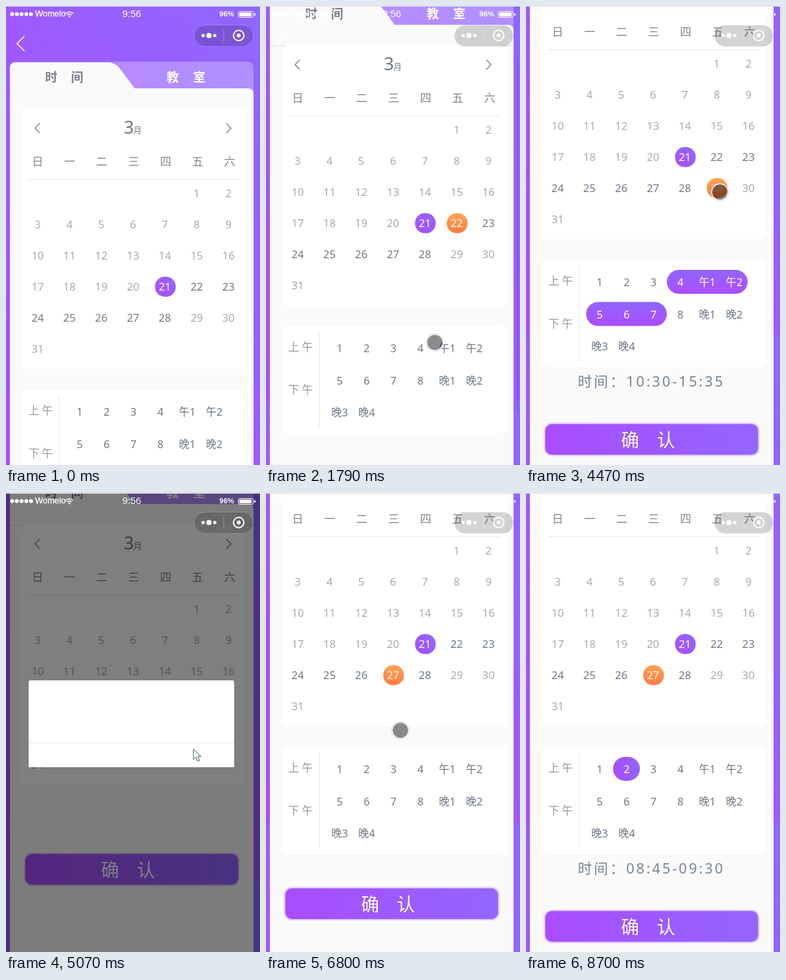
Write an HTML page that moves like this. It is 393 by 708 pixels and loops after 9650 ms.

```html
<!DOCTYPE html>
<html lang="zh-CN">
<head>
<meta charset="utf-8">
<title>选择时间</title>
<style>
  html, body { margin: 0; width: 100%; height: 100%; overflow: hidden; background: #a052ff; }
  #stage { position: absolute; left: 0; top: 0; width: 393px; height: 708px; overflow: hidden; }
  svg { position: absolute; left: 0; top: 0; overflow: hidden; }
  text { font-family: "Noto Sans", "Noto Sans CJK SC", "Noto Sans CJK", sans-serif; white-space: pre; }
  .bar text { font-family: "Liberation Sans", Arial, sans-serif; }
  #modal { position: absolute; left: 35px; top: 288.5px; width: 318px; height: 134px; border-radius: 3px;
    background: #fff; box-shadow: 0 0 0 900px rgba(0,0,0,.5); }
  #key { position: absolute; left: 0; bottom: 0; width: 100%; height: 38px; border-top: 1px solid #e5e5e5;
    box-sizing: border-box; }
</style>
</head>
<body>
<div id="stage">
  <svg width="393" height="708">
    <defs>
      <linearGradient id="bg" x1="0" y1="1" x2="1" y2="0"><stop stop-color="#ad4cff"/><stop offset="1" stop-color="#8f68ff"/></linearGradient>
      <linearGradient id="flat"><stop stop-color="#a94cff"/><stop offset="1" stop-color="#9366ff"/></linearGradient>
      <linearGradient id="tall" x1="0" y1="0" x2="0" y2="1"><stop stop-color="#9166ff"/><stop offset="1" stop-color="#ad4cff"/></linearGradient>
      <linearGradient id="warm" x1="0" y1="0" x2="0" y2="1"><stop stop-color="#ffa552"/><stop offset="1" stop-color="#ff7a42"/></linearGradient>
      <filter id="glow" x="-5%" y="-20%" width="110%" height="140%"><feGaussianBlur stdDeviation="1.8"/></filter>
    </defs>
    <g id="page">
      <rect width="393" height="708" fill="url(#bg)"/>
      <rect y="708" width="393" height="708" fill="url(#bg)"/>
      <path d="M6 140V96Q6 86 16 86H373Q383 86 383 96V140Z" fill="#fff" fill-opacity=".28"/>
      <path d="M6 1416V96Q6 87 15 87H157Q168 87 175 95L199 127H374Q383 127 383 136V1416Z" fill="#fafafa"/>
      <path id="seam" d="M6 159.5H383" stroke="#dcdcdc"/>
      <rect x="24" y="159" width="348" height="401" rx="9" fill="#fff"/>
      <path d="M52 181L45 188.5L52 196M341 181L348 188.5L341 196" fill="none" stroke="#8e9097" stroke-width="1.8"/>
      <path d="M33 267.5H362" stroke="#e6e6e6"/>
      <g id="days"></g>
      <g id="card">
        <rect x="24" y="592" width="348" height="165" rx="9" fill="#fff"/>
        <path d="M82.5 600V748" stroke="#e8e8e8"/>
      </g>
      <text id="span" x="80" y="787" font-size="22" letter-spacing="3" fill="#7a8394"></text>
      <g id="ok">
        <rect x="29" y="-1" width="331" height="49" rx="11" fill="#a050ff" fill-opacity=".65" filter="url(#glow)"/>
        <rect x="30" width="329" height="47" rx="10" fill="url(#flat)"/>
      </g>
    </g>
    <path d="M28.5 46.5L17 58L28.5 69.5" fill="none" stroke="#fff" stroke-width="1.5"/>
    <rect id="thumb" x="388" width="3" height="545" rx="1.5" fill-opacity=".08"/>
  </svg>
  <div id="modal"><div id="key"></div></div>
  <svg class="bar" width="393" height="708" fill="#fff">
    <rect width="393" height="1" fill="#e2dfe8"/>
    <g id="dots"></g>
    <text x="45" y="16" font-size="13" stroke="#fff" stroke-width=".3">Womelo</text>
    <path d="M92 11.5Q98 6.5 104 11.5M94.3 14Q98 10.8 101.7 14" fill="none" stroke="#fff" stroke-width="1.5"/>
    <circle cx="98" cy="16" r="1.5"/>
    <text x="194.5" y="17" font-size="15" text-anchor="middle">9:56</text>
    <text x="330" y="16" font-size="11.5" font-weight="bold">96%</text>
    <rect x="359.5" y="8.5" width="23" height="9" rx="2" fill="none" stroke="#fff"/>
    <rect x="361" y="10" width="19" height="6" rx="1"/>
    <rect x="384" y="11" width="2" height="4" rx="1"/>
    <rect x="291.5" y="29.5" width="91" height="33" rx="16.5" fill="#000" fill-opacity=".17" stroke="#fff" stroke-opacity=".2"/>
    <path d="M337 37V55" stroke="#fff" stroke-opacity=".35"/>
    <circle cx="305" cy="45.5" r="2.6"/><circle cx="314" cy="45.5" r="4"/><circle cx="323" cy="45.5" r="2.6"/>
    <circle cx="360" cy="45.5" r="8" fill="none" stroke="#fff" stroke-width="2"/><circle cx="360" cy="45.5" r="3"/>
    <g id="touch">
      <circle id="pad" r="12" fill="#000"/>
      <circle r="12.8" fill="none" stroke="#fff" stroke-width="1.5"/>
      <circle r="13.8" fill="none" stroke="#bbb" stroke-width=".6"/>
    </g>
    <path id="arrow" d="M0 0V16L4 12.5L6.8 18.8L9.5 17.6L6.7 11.5H11.5Z" stroke="#2f5a45"/>
  </svg>
</div>
<script>
const LOOP = 9650;
const SCROLL = 200, DRAG = 1582, DRAG_END = 2310;
const REFUSE = 4540, REOPEN = 6800;
const DARK = "#6f7787", PALE = "#aaa";

// pointer moves: start, end, and where it comes to rest
const moves = [
  [230, 870, 302, 436], [1400, DRAG, 277, 605], [DRAG, DRAG_END, 245, 430],
  [2700, 2860, 203, 481], [3090, 3230, 250, 625], [3460, 3620, 230, 182], [3770, 4160, 300, 287],
  [4600, 5070, 290, 395], [5500, 5640, 284, 421], [5700, 6490, 208, 366],
  [6880, 7410, 170, 440], [8360, 8700, 246, 740]
];

const $ = id => document.getElementById(id);
const page = $("page"), days = $("days"), card = $("card"), ok = $("ok");

function set(el, attrs) {
  for (const k in attrs) el.setAttribute(k, attrs[k]);
  return el;
}
function add(parent, tag, attrs) {
  return parent.appendChild(set(document.createElementNS("http://www.w3.org/2000/svg", tag), attrs));
}
function word(parent, str, x, y, size, fill, weight = 400) {
  const el = add(parent, "text", { x, y: y + size * .36, "font-size": size, fill, "font-weight": weight, "text-anchor": "middle" });
  el.textContent = str;
  return el;
}
const show = (el, on) => set(el, { visibility: on ? "visible" : "hidden" });
const part = (t, a, b) => Math.min(1, Math.max(0, (t - a) / (b - a)));
const ease = p => p * (2 - p);

// calendar
[..."时间"].forEach((c, i) => word(page, c, 70 + i * 40, 110, 19, "#7b808d", 700));
[..."教室"].forEach((c, i) => word(page, c, 258 + i * 41, 110, 19, "#fff", 700));
word(days, "3", 190, 187, 27.5, DARK);
word(days, "月", 203.5, 191, 13, DARK);
[..."日一二三四五六"].forEach((c, i) => word(days, c, 49 + i * 49.5, 240, 17.5, "#82868f"));

const cell = d => ({ x: 49 + (d + 4) % 7 * 49.2, y: 289 + Math.floor((d + 4) / 7) * 48 });
const disc = fill => add(days, "rect", { width: 32, height: 31, rx: 15, fill });
const place = (el, d) => set(el, { x: cell(d).x - 15.2, y: cell(d).y - 15.5 });
const today = disc("url(#bg)"), mark = disc("url(#warm)");
place(today, 21);
const isOpen = d => d > 20 && d < 29;
const dates = Array.from({ length: 31 }, (_, i) => {
  const { x, y } = cell(i + 1);
  return word(days, i + 1, x, y, 16.8, PALE, isOpen(i + 1) ? 500 : 400);
});

// lesson slots
["上午", "下午"].forEach((s, r) => [...s].forEach((c, i) => word(card, c, 43 + i * 21, 624 + r * 66, 17, "#999")));
const COL = 41.65, ROW = 49.6;
const pills = [0, 1].map(r => add(card, "rect", { y: 607 + r * ROW, height: 37, rx: 18.5 }));
const slots = "1 2 3 4 午1 午2 5 6 7 8 晚1 晚2 晚3 晚4".split(" ").map((s, i) =>
  word(card, s, 114 + i % 6 * COL, 626 + Math.floor(i / 6) * ROW, 16.5, DARK));
[..."确认"].forEach((c, i) => word(ok, c, 161 + i * 55.5, 25, 28, "#fff", 500));
for (let i = 0; i < 5; i++) add($("dots"), "circle", { cx: 9.5 + i * 7.3, cy: 12.5, r: 3 });

function pointer(t) {
  let x = 270, y = 735;
  for (const [a, b, tx, ty] of moves) {
    const p = ease(part(t, a, b));
    x += (tx - x) * p;
    y += (ty - y) * p;
  }
  return `translate(${x} ${y})`;
}
function pickedDay(t) {
  if (t >= REOPEN) return 27;
  if (t < 1400 || t >= REFUSE) return 0;
  return t < 4470 ? 22 : 29;
}
function pickedSlots(t) {
  if (t >= 7640) return { from: 1, to: 1, span: "08:45-09:30" };
  if (t < 2700 || t >= REFUSE) return null;
  return t < 3090 ? { from: 3, to: 3, span: "10:30-11:15" } : { from: 3, to: 8, span: "10:30-15:35" };
}

function drawPage(t, closed) {
  const scroll = closed ? 110 : Math.round(SCROLL * ease(part(t, DRAG, DRAG_END)));
  set(page, { transform: `translate(0 ${-scroll})` });
  show($("seam"), scroll > 0);
  show($("thumb"), t > DRAG && t < 2390);
  set($("thumb"), { y: 5 + scroll * .76, fill: "#000" });

  const day = pickedDay(t);
  show(mark, day > 0);
  if (day) place(mark, day);
  dates.forEach((el, i) => {
    const d = i + 1, lit = d === 21 || d === day;
    set(el, { fill: lit ? (isOpen(d) ? "#fff" : "#d0c0b8") : isOpen(d) ? DARK : PALE });
  });
}

function drawSlots(t, closed) {
  const pick = pickedSlots(t);
  set(card, { display: closed ? "none" : "inline" });
  pills.forEach((el, r) => {
    const from = pick ? Math.max(pick.from - r * 6, 0) : 0;
    const count = pick ? Math.min(pick.to - r * 6, 5) - from + 1 : 0;
    show(el, count > 0);
    if (count > 0) set(el, { x: 93 + from * COL, width: count * COL, fill: count > 1 ? "url(#tall)" : "url(#flat)" });
  });
  slots.forEach((el, i) => set(el, { fill: pick && i >= pick.from && i <= pick.to ? "#fff" : DARK }));
  $("span").textContent = pick ? "时间：" + pick.span : "";
  set(ok, { transform: `translate(0 ${closed ? 667 : pick ? 845 : 810})` });
}

function drawTop(t) {
  const p = part(t, 4480, 4700) * (1 - part(t, 5524, 5756));
  $("modal").style.opacity = p;
  $("modal").style.transform = `scaleY(${p})`;
  $("key").style.background = t >= 5240 && t < 5380 ? "#ececec" : "#fff";
  $("key").style.visibility = t < 5550 ? "visible" : "hidden";

  const native = t >= REFUSE && t < 5780;
  show(set($("touch"), { transform: pointer(t) }), !native);
  show(set($("arrow"), { transform: pointer(t) }), native);
  set($("pad"), { "fill-opacity": t >= 4330 && t < 4470 ? .6 : .45 });
}

const begin = performance.now();
function tick() {
  const t = (performance.now() - begin) % LOOP;
  const closed = t >= REFUSE && t < REOPEN;
  drawPage(t, closed);
  drawSlots(t, closed);
  drawTop(t);
  requestAnimationFrame(tick);
}
tick();
</script>
</body>
</html>
```
